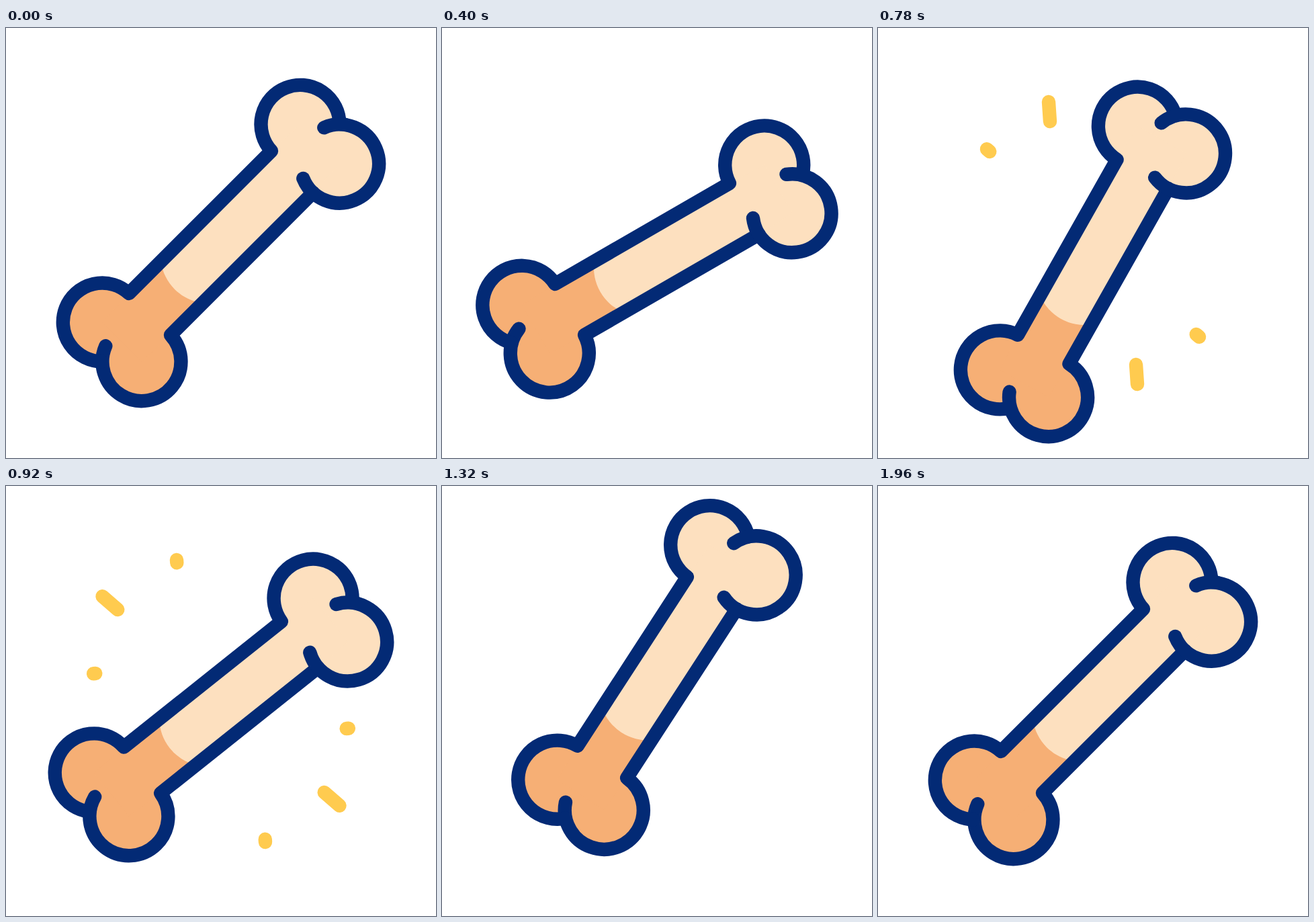
Write an HTML page that moves like this. It is 640 by 640 pixels and loops after 2.4 s.

```html
<!DOCTYPE html>
<html lang="en">
<head>
<meta charset="utf-8">
<title>Bone</title>
<style>
  html, body { margin: 0; width: 100%; height: 100%; overflow: hidden; background: #fff; }
  svg { display: block; width: 100%; height: 100%; }
  .line { fill: none; stroke: #032a75; stroke-width: 20.4; stroke-linecap: round; stroke-linejoin: round; }
  .light { fill: #fde0bf; }
  .dark { fill: #f6af75; }
  #sparks { stroke: #ffcb4f; stroke-width: 20.4; stroke-linecap: round; }
</style>
</head>
<body>
<svg viewBox="0 0 640 640">
  <g id="sparks">
    <g id="half"><path/><path/><path/></g>
    <use href="#half" transform="rotate(180 320 320)"/>
  </g>
  <g id="bone">
    <g class="light">
      <circle cx="438" cy="143" r="58.5"/>
      <circle cx="497" cy="202" r="58.5"/>
      <path d="M395 183L438 143L497 202L457 245L245 457L183 395Z"/>
    </g>
    <g class="dark">
      <circle cx="143" cy="438" r="58.5"/>
      <circle cx="202" cy="497" r="58.5"/>
      <path d="M183 395L230.6 347.4A72 72 0 0 0 292.6 409.4L245 457L202 497L143 438Z"/>
    </g>
    <g class="line">
      <path d="M457 245L245 457A58.5 58.5 0 1 1 148.3 473.3"/>
      <path d="M143 496.5A58.5 58.5 0 1 1 183 395L395 183A58.5 58.5 0 1 1 496.5 143"/>
      <path d="M473.3 148.3A58.5 58.5 0 1 1 442.3 224"/>
    </g>
  </g>
</svg>
<script>
const LOOP = 2400, GROW = 200;
const bone = document.getElementById('bone');
const paths = document.querySelectorAll('#half path');

// [time, value] keys
const height = [[0, 0], [645, 35.4], [1315, -35], [1955, 0]];
const tilt = [[0, 0], [400, 15], [714, -20], [1004, 13], [1320, -12], [1640, 7], [1958, 0]];

// start time, inner end, outer end
const sparks = [
  [570, 256, 139.3, 254, 110],
  [725, 166.3, 184, 143.5, 164.2],
  [880, 133.3, 279, 104, 281]
];

const ease = p => {
  p = Math.min(1, Math.max(0, p));
  return p * p * (3 - 2 * p);
};

function valueAt(keys, t) {
  const i = keys.findIndex(key => key[0] > t);
  if (i < 0) return keys[keys.length - 1][1];
  const [t0, v0] = keys[i - 1], [t1, v1] = keys[i];
  return v0 + (v1 - v0) * ease((t - t0) / (t1 - t0));
}

function drawSpark([start, x0, y0, x1, y1], path, t) {
  const head = ease((t - start) / GROW);
  const tail = ease((t - start - GROW) / GROW);
  const point = p => `${x0 + (x1 - x0) * p} ${y0 + (y1 - y0) * p}`;
  path.setAttribute('d', head > tail ? `M${point(tail)}L${point(head)}` : '');
}

function draw(now) {
  const t = now % LOOP;
  bone.setAttribute('transform',
    `translate(0 ${valueAt(height, t)}) rotate(${valueAt(tilt, t)} 320 320)`);
  sparks.forEach((spark, i) => drawSpark(spark, paths[i], t));
}

const begin = performance.now();
function tick() {
  draw(performance.now() - begin);
  requestAnimationFrame(tick);
}
tick();
</script>
</body>
</html>
```
